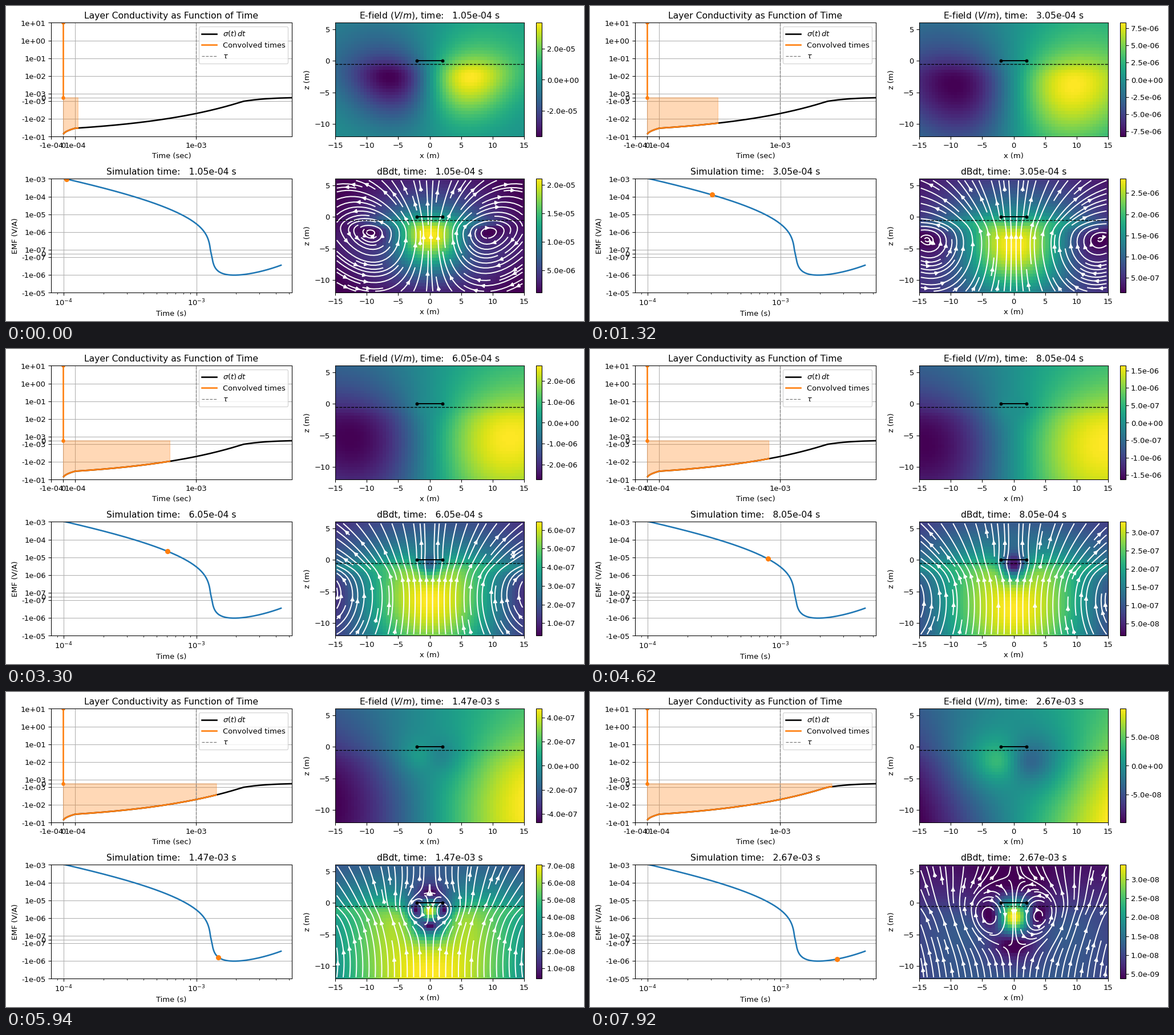
Recreate the animation shown at these times as a matplotlib script. Size 1013x553 px, loop 8000 ms.

```python
import math

import matplotlib.pyplot as plt
import numpy as np
from matplotlib.animation import FuncAnimation
from matplotlib.ticker import MaxNLocator

W, H, DPI = 1013, 553, 94
STEP_MS, TICK_MS, TICKS = 330, 160, 50
ORANGE = "tab:orange"
LIN_X, LIN_Y = 0.1, 0.222          # half-widths of the linear zones, in decades
SURFACE, LOOP_RADIUS = -0.5, 2.0


# Rules in time; t is in milliseconds
def sim_time(step):
    return 0.105 + 0.05 * step if step < 15 else 0.87 + 0.2 * (step - 15)


def decay(t, size, start, power, rate):
    return size * (t + start) ** -power * np.exp(-rate * t)


def conductivity(t):
    return -0.08 * np.exp(-2.8 * np.sqrt(t))


def emf(t):
    return decay(t, 3.867e-5, 0, 1.53, 2) - 4.47e-6 * np.exp(-0.64 * t)


def e_range(t):
    return decay(t, 2.01e-6, 0.018, 1.42, 0.6)


def b_range(t):
    top = max(decay(t, 3.292e-7, 0.03, 2.1, 0.47), decay(t, 1.12e-7, 0, 1.22, 0))
    return max(0.05 * top, 3.8e-9), top


def symlog(v, thresh, lin):
    a = np.abs(v) / thresh
    return np.sign(v) * np.where(a < 1, lin * a, lin + np.log10(np.maximum(a, 1)))


# Fields on the cross-section
x = np.arange(-14.75, 15, 0.5)
z = np.arange(-11.75, 6, 0.5)
r = x[x > 0]
theta = (np.arange(60) + 0.5) * math.pi / 60
erfc = np.vectorize(math.erfc)


def bessel1(v):
    v = np.asarray(v)[..., None]
    return np.cos(theta - v * np.sin(theta)).mean(axis=-1)


def diffusing_ring(t):
    """Azimuthal E of a switched-off loop above a conductive half-space."""
    root = math.sqrt(6 + 95 * t)
    q = np.linspace(0.01, 4, 90)[:, None]
    lam = q / root
    depth = np.maximum(SURFACE - z, 0)
    d = (depth + 1.4 * depth ** 2 / (depth ** 2 + 2)) / root
    kernel = (np.exp(-q ** 2 - d ** 2 / 4) / math.sqrt(math.pi)
              - q * np.exp(q * d) * erfc(q + d / 2))
    kernel = kernel * np.exp(-lam * np.maximum(z - SURFACE, 0))
    half = (kernel * lam * bessel1(LOOP_RADIUS * lam)).T @ bessel1(lam * r)
    return np.hstack([-half[:, ::-1], half])


def fields(t):
    e = diffusing_ring(t)
    # Opposite, slowly spreading polarisation current below the loop
    zc, size = -(0.5 + 0.7 * t), 2 + 1.2 * t
    strength = 6 * t ** 2 / (t ** 2 + 3.4)
    slope = np.interp(zc, z, e[:, len(r)]) / r[0]
    spread = x ** 2 + (1.3 * (z[:, None] - zc)) ** 2 + size ** 2
    e = e - strength * slope * size ** 3 * x / spread ** 1.5
    e *= e_range(t) / np.abs(e).max()
    bx = -np.gradient(e, z, axis=0)
    bz = np.gradient(x * e, x, axis=1) / x
    return e, bx, bz


# Figure
fig = plt.figure(figsize=((W + 1e-6) / DPI, (H + 1e-6) / DPI), dpi=DPI)


def panel(left, top, right, bottom):
    return fig.add_axes([left / W, 1 - bottom / H, (right - left) / W, (bottom - top) / H])


def set_ticks(axis, values, thresh, lin):
    axis.set_ticks(symlog(np.array(values), thresh, lin),
                   ["0" if v == 0 else f"{v:.0e}" for v in values])


def decades(neg, pos, thresh):
    """Tick values from -10**neg through zero to 10**pos."""
    return ([-10.0 ** k for k in range(neg, thresh - 1, -1)] + [0]
            + [10.0 ** k for k in range(thresh, pos + 1)])


ROWS = (29.5, 229.5), (303.5, 503.5)
ax_sig, ax_emf = (panel(79, a, 501, b) for a, b in ROWS)
ax_e, ax_b = (panel(577, a, 908, b) for a, b in ROWS)
cax_e, cax_b = (panel(928.6, a, 938.7, b) for a, b in ROWS)

# Conductivity
sig_x = np.linspace(0.004, 1.893, 600)
sig_t = np.where(sig_x < LIN_X, sig_x / LIN_X * 0.1, 0.1 * 10 ** (sig_x - LIN_X))
sig_y = symlog(conductivity(sig_t), 1e-3, LIN_Y)
ax_sig.plot(sig_x, sig_y, "k", lw=2, label=r"$\sigma(t) \, dt$")
past, = ax_sig.plot([], [], color=ORANGE, lw=2, label="Convolved times")
ax_sig.plot([0, 0], [0, 4 + LIN_Y], "o-", color=ORANGE, lw=2, ms=4)
ax_sig.axvline(1 + LIN_X, color="gray", ls="--", lw=1, label=r"$\tau$")
set_ticks(ax_sig.xaxis, [-1e-4, 0, 1e-4, 1e-3], 1e-4, LIN_X)
set_ticks(ax_sig.yaxis, decades(-1, 1, -3), 1e-3, LIN_Y)
ax_sig.set(xlim=(-LIN_X, 1.893), ylim=(-2 - LIN_Y, 4 + LIN_Y), xlabel="Time (sec)",
           title="Layer Conductivity as Function of Time")
ax_sig.legend(loc="upper right")

# Receiver decay, on decades after 0.1 ms
emf_x = np.linspace(-0.01, 1.6387, 600)


def emf_height(log_t):
    return symlog(emf(0.1 * 10 ** log_t), 1e-7, LIN_Y)


ax_emf.plot(emf_x, emf_height(emf_x), color="tab:blue", lw=2)
dot, = ax_emf.plot([], [], "o", color=ORANGE, ms=6)
ax_emf.set_xticks([0, 1], ["$10^{-4}$", "$10^{-3}$"])
ax_emf.set_xticks(np.log10([0.9, *range(2, 10), *range(20, 60, 10)]), minor=True)
set_ticks(ax_emf.yaxis, decades(-5, -3, -7), 1e-7, LIN_Y)
ax_emf.set(xlim=(-0.0946, 1.7204), ylim=(-2 - LIN_Y, 4 + LIN_Y),
           xlabel="Time (s)", ylabel="EMF (V/A)")
for ax in (ax_sig, ax_emf):
    ax.grid(True)
    ax.set_axisbelow(True)


def section(ax, cax):
    im = ax.imshow(np.zeros((len(z), len(x))), origin="lower", aspect="auto",
                   extent=(-15, 15, -12, 6), interpolation="nearest", cmap="viridis")
    ax.axhline(SURFACE, color="k", ls="--", lw=1, zorder=3)
    ax.plot([-LOOP_RADIUS, LOOP_RADIUS], [0, 0], "ko-", lw=1.5, ms=3.5, zorder=4)
    ax.set(xlim=(-15, 15), ylim=(-12, 6), xticks=range(-15, 16, 5),
           yticks=range(-10, 6, 5), xlabel="x (m)", ylabel="z (m)")
    fig.colorbar(im, cax=cax, format="%.1e",
                 ticks=MaxNLocator(7, steps=[1, 2, 2.5, 5, 10]))
    return im


im_e, im_b = section(ax_e, cax_e), section(ax_b, cax_b)
state = {"step": None, "fill": None, "lines": None}


def show_step(step):
    t = sim_time(step)
    log_t = math.log10(t / 0.1)
    label = f"time: {t * 1e-3:10.2e} s"

    now = LIN_X + log_t
    seen = sig_x <= now
    px = np.append(sig_x[seen], now)
    py = np.append(sig_y[seen], np.interp(now, sig_x, sig_y))
    past.set_data(px, py)
    if state["fill"]:
        state["fill"].remove()
    state["fill"] = ax_sig.fill_between(np.append(0, px), np.append(py[0], py), 0,
                                        color=ORANGE, alpha=0.3)

    dot.set_data([log_t], [emf_height(log_t)])
    ax_emf.set_title("Simulation " + label)

    e, bx, bz = fields(t)
    im_e.set_data(e)
    im_e.set_clim(-e_range(t), e_range(t))
    ax_e.set_title("E-field ($V/m$), " + label)

    mag = np.hypot(bx, bz)
    low, top = b_range(t)
    im_b.set_data(mag * top / mag.max())
    im_b.set_clim(low, top)
    ax_b.set_title("dBdt, " + label)
    if state["lines"]:
        state["lines"].remove()
        for arrow in list(ax_b.patches):
            arrow.remove()
    state["lines"] = ax_b.streamplot(x, z, bx, bz, color="w", linewidth=1.5).lines


def update(n):
    step = (n * TICK_MS + TICK_MS - 1) // STEP_MS
    if step != state["step"]:
        state["step"] = step
        show_step(step)
    return []


anim = FuncAnimation(fig, update, frames=TICKS, interval=TICK_MS, repeat=True,
                     repeat_delay=0)
plt.show()
```
